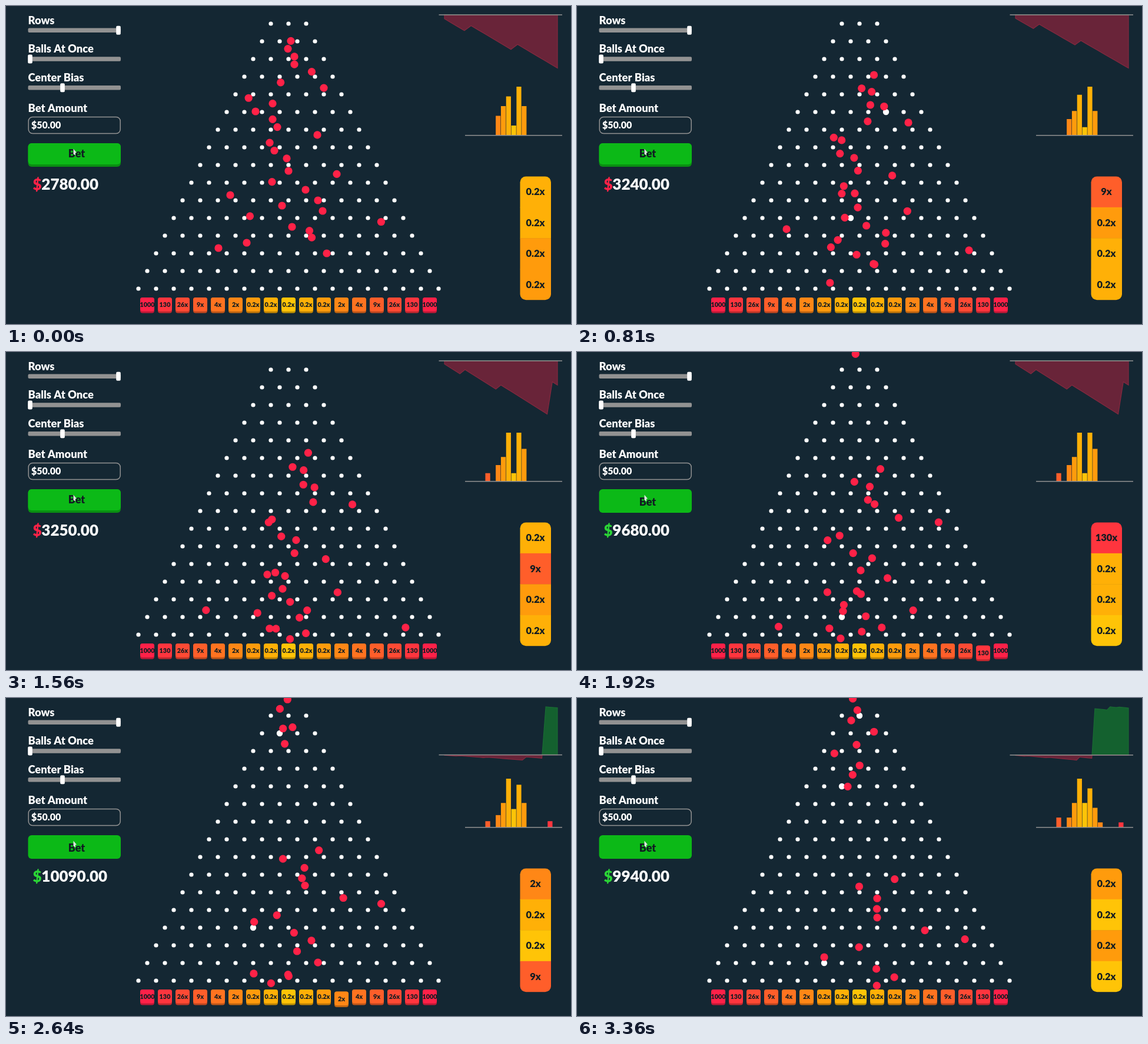
An HTML page with a canvas for the animation above (3.39 s loop, 960 by 540 pixels).

```html
<!DOCTYPE html>
<html lang="en">
<head>
<meta charset="utf-8">
<title>Ball drop</title>
<style>
html, body { margin: 0; width: 100%; height: 100%; overflow: hidden; background: #142733; }
canvas { display: block; width: 960px; height: 540px; }
</style>
</head>
<body>
<canvas id="stage" width="960" height="540"></canvas>
<script>
const ctx = document.getElementById('stage').getContext('2d');
const LOOP = 3390, LAST = 3360, ROW = 30, CONTACT = 10, BIN_TOP = 497;
const BET = 50, FIRST_BALANCE = 2780, STAKE = 5000;
const PAYOUTS = [1000, 130, 26, 9, 4, 2, 0.2, 0.2, 0.2];
const GREY = '#929292', RED = '#ff2247', INK = '#111c22';

const lerp = (a, b, u) => a + (b - a) * u;
const payout = col => PAYOUTS[8 - Math.abs(8 - col)];
const binX = col => 240 + 30 * col;
function binColor(col, shade = 1) {
  const k = 8 - Math.abs(8 - col);
  return `rgb(${255 * shade},${(33 + 20.4 * k) * shade},${Math.max(7, 72 - 10 * k) * shade})`;
}

let seed = 7;
function random() {
  seed = (seed * 16807) % 2147483647;
  return seed / 2147483647;
}

// Falling: a ball hops a little on each row, then drops to the next one.
const HOP = 0.7;
function yToPhase(y) {
  const rows = (y - 20) / ROW, whole = Math.floor(rows), part = rows - whole;
  return whole + (HOP + Math.sqrt(HOP * HOP + 4 * (1 + HOP) * part)) / (2 * (1 + HOP));
}
function phaseToY(p) {
  const whole = Math.floor(p), s = p - whole;
  return 20 + ROW * (whole + s * ((1 + HOP) * s - HOP));
}

const balls = [];
function addBall(t0, x0, y0, t1, x1, y1) {
  balls.push({ t0, x0, t1, x1, from: yToPhase(y0), to: yToPhase(y1), sway: random() * 2 * Math.PI });
}

// Bins already hit; the charts have yet to count the last two.
const landings = [6, 7, 9, 10, 5, 7, 9, 8, 9, 7, 9, 5, 7, 9, 10, 6, 10, 6, 9, 7]
  .map((col, i) => ({ t: i < 18 ? -2 : 0, col, paid: true }));
const chartUpdates = [-1, 120, 960, 1420, 2240, 2950];

// Balls in the air at the start, lowest first: where each is and its bin.
const startX = [546, 361, 409, 519, 514, 486, 638, 414, 538, 469, 535, 381, 509, 452, 562, 480,
  477, 456, 448, 529, 461, 453, 424, 453, 417, 540, 466, 520, 490, 490, 479, 484];
const targetCol = [10, 3, 7, 8, 9, 7, 15, 7, 8, 6, 9, 3, 8, 7, 11, 7,
  8, 6, 8, 10, 9, 10, 9, 6, 8, 14, 12, 9, 9, 9, 8, 10];
const LANDING_COUNT = 20;
const landingTime = n => n < 3 ? 240 + 470 * n : 1630 + 90 * (n - 3);

startX.forEach((x, n) => {
  const col = targetCol[n], y = Math.min(420 - 9 * n, 471.6 - 13.3 * n);
  if (n < LANDING_COUNT) {
    addBall(0, x, y, landingTime(n), binX(col), BIN_TOP);
    landings.push({ t: landingTime(n), col });
  } else {
    addBall(0, x, y, LOOP, binX(col), 494 - 16.5 * (n - LANDING_COUNT));
  }
});

const bets = Array.from({ length: 10 }, (_, i) => 1680 + 185 * i);
bets.forEach(t => {
  const fall = 0.1 * (LOOP - t);
  addBall(t, 465 + 12 * random(), -15, LOOP, 475 + (random() - 0.5) * (40 + fall * 0.4), fall - 15);
});

function ballAt(ball, t) {
  if (t < ball.t0 || t >= ball.t1) return null;
  const u = (t - ball.t0) / (ball.t1 - ball.t0), phase = lerp(ball.from, ball.to, u);
  const sway = 9 * Math.sin(Math.PI * u) * Math.sin(Math.PI * phase + ball.sway);
  return { x: lerp(ball.x0, ball.x1, u) + sway, y: phaseToY(phase) };
}

function nearestPeg(p) {
  const row = Math.max(0, Math.min(15, Math.round((p.y - 30) / ROW)));
  const left = 450 - 15 * row;
  const k = Math.max(0, Math.min(row + 2, Math.round((p.x - left) / ROW)));
  const x = left + k * ROW, y = 30 + row * ROW;
  return { x, y, d: Math.hypot(p.x - x, p.y - y) };
}

function disc(x, y, r, color) {
  ctx.fillStyle = color;
  ctx.beginPath();
  ctx.arc(x, y, r, 0, 2 * Math.PI);
  ctx.fill();
}
function box(x, y, w, h, r, color) {
  ctx.fillStyle = color;
  ctx.beginPath();
  ctx.roundRect(x, y, w, h, r);
  ctx.fill();
}
function label(text, x, y, size, color = '#fff', align = 'left') {
  ctx.font = `900 ${size}px Lato, sans-serif`;
  ctx.textAlign = align;
  ctx.textBaseline = 'middle';
  ctx.fillStyle = color;
  ctx.fillText(text, x, y);
}

function drawControls(t, balance) {
  [['Rows', 191], ['Balls At Once', 41], ['Center Bias', 96]].forEach(([name, thumb], i) => {
    const y = 25 + 48.75 * i;
    label(name, 37.5, y, 18.4);
    box(37.5, y + 12.5, 157.5, 7.5, 2, GREY);
    box(thumb - 3.8, y + 8.7, 7.6, 15, 2, '#fff');
  });
  label('Bet Amount', 37.5, 174.5, 18.4);
  ctx.strokeStyle = GREY;
  ctx.lineWidth = 1.5;
  ctx.beginPath();
  ctx.roundRect(38.2, 188.5, 156, 28, 7);
  ctx.stroke();
  label('$50.00', 43, 203, 16);

  const pressed = bets.some(b => t >= b && t < b + 90);
  box(37.5, 233, 157.5, 40, 6, pressed ? '#0cb917' : '#0a8f12');
  if (!pressed) box(37.5, 233, 157.5, 36, 6, '#0cb917');
  label('Bet', 120, pressed ? 255.5 : 252, 18, INK, 'center');
  ctx.fillStyle = '#dfe5e2';
  ctx.beginPath();
  [[114.5, 242.5], [114.5, 251.5], [118, 253.5], [117.8, 249.5], [120, 249]]
    .forEach(([x, y]) => ctx.lineTo(x, y));
  ctx.fill();

  label('$', 45.5, 304, 26, balance > STAKE ? '#2bd536' : RED);
  label(balance.toFixed(2), 60.3, 304, 26);
}

// Keeps balls outside the pegs; a peg lights up when it is first struck.
function collide(t) {
  const shown = [], struck = [];
  for (const ball of balls) {
    const p = ballAt(ball, t);
    if (!p) continue;
    const peg = nearestPeg(p);
    if (peg.d < CONTACT && peg.d > 0) {
      const before = ballAt(ball, t - 60);
      if (before && Math.hypot(before.x - peg.x, before.y - peg.y) >= CONTACT) struck.push(peg);
      p.x = peg.x + (p.x - peg.x) * CONTACT / peg.d;
      p.y = peg.y + (p.y - peg.y) * CONTACT / peg.d;
    }
    shown.push(p);
  }
  return { shown, struck };
}

function drawPegs(struck) {
  for (let row = 0; row < 16; row++)
    for (let k = 0; k < row + 3; k++)
      disc(450 - 15 * row + 30 * k, 30 + 30 * row, 3.6, '#fff');
  struck.forEach(peg => disc(peg.x, peg.y, 5.2, '#fff'));
}

function drawBins(t) {
  for (let col = 0; col < 17; col++) {
    const hit = landings.find(l => !l.paid && l.col === col && t >= l.t && t < l.t + 60);
    const y = 495 + (hit ? 4 * Math.sin(Math.PI * (t - hit.t) / 60) : 0);
    const x = binX(col), m = payout(col);
    box(x - 12, y, 24, 26.5, 4, binColor(col, 0.75));
    box(x - 12, y, 24, 23.5, 4, binColor(col));
    label(m >= 100 ? m : m + 'x', x, y + 13, 10.8, INK, 'center');
  }
}

function axis(x, y) {
  ctx.fillStyle = GREY;
  ctx.fillRect(x, y - 0.75, 945 - x, 1.5);
}

function drawProfit(list) {
  let sum = 0;
  const values = list.map(l => sum += (payout(l.col) - 1) * BET);
  const high = Math.max(0, ...values), low = Math.min(0, ...values);
  const scale = 90.5 / (high - low), base = 15 + high * scale;
  const step = 192 / (values.length - 1);
  const area = new Path2D();
  area.moveTo(745, base);
  values.forEach((v, i) => area.lineTo(745 + i * step, base - v * scale));
  area.lineTo(937, base);
  area.closePath();
  [[0, base, '#196b33', '#14612f'], [base, 540, '#85293f', '#692439']]
    .forEach(([top, bottom, edge, fill]) => {
      ctx.save();
      ctx.beginPath();
      ctx.rect(730, top, 230, bottom - top);
      ctx.clip();
      ctx.fillStyle = fill;
      ctx.fill(area);
      ctx.strokeStyle = edge;
      ctx.lineWidth = 1.2;
      ctx.stroke(area);
      ctx.restore();
    });
  axis(735.5, base);
}

function drawHistogram(list) {
  const counts = Array(17).fill(0);
  list.forEach(l => counts[l.col]++);
  const unit = 82.5 / Math.max(...counts);
  counts.forEach((n, col) => {
    ctx.fillStyle = binColor(col);
    ctx.fillRect(788 + 8.82 * col, 219.5 - n * unit, 8.2, n * unit);
  });
  axis(780, 219.7);
}

function drawResults(list) {
  ctx.save();
  ctx.beginPath();
  ctx.roundRect(873.5, 289.3, 52.5, 210, 10);
  ctx.clip();
  list.slice(-4).reverse().forEach((l, i) => {
    const y = 289.3 + 52.5 * i;
    ctx.fillStyle = binColor(l.col);
    ctx.fillRect(873, y, 54, 53);
    label(payout(l.col) + 'x', 899.5, y + 27, 16.5, INK, 'center');
  });
  ctx.restore();
}

function draw(t) {
  ctx.fillStyle = '#142733';
  ctx.fillRect(0, 0, 960, 540);
  const landed = landings.filter(l => l.t <= t);
  const update = Math.max(...chartUpdates.filter(u => u <= t));
  const charted = landings.filter(l => l.t <= update);
  const won = landed.reduce((sum, l) => sum + (l.paid ? 0 : payout(l.col) * BET), 0);
  const balance = FIRST_BALANCE + won - BET * bets.filter(b => b <= t).length;

  drawControls(t, balance);
  drawProfit(charted);
  drawHistogram(charted);
  drawResults(landed);
  const { shown, struck } = collide(t);
  drawPegs(struck);
  drawBins(t);
  shown.forEach(p => disc(p.x, p.y, 6.6, RED));
}

const begin = performance.now();
function frame() {
  const t = (performance.now() - begin) % LOOP;
  draw(Math.min(LAST, Math.floor(t / 30) * 30));
  requestAnimationFrame(frame);
}
frame();
</script>
</body>
</html>
```
